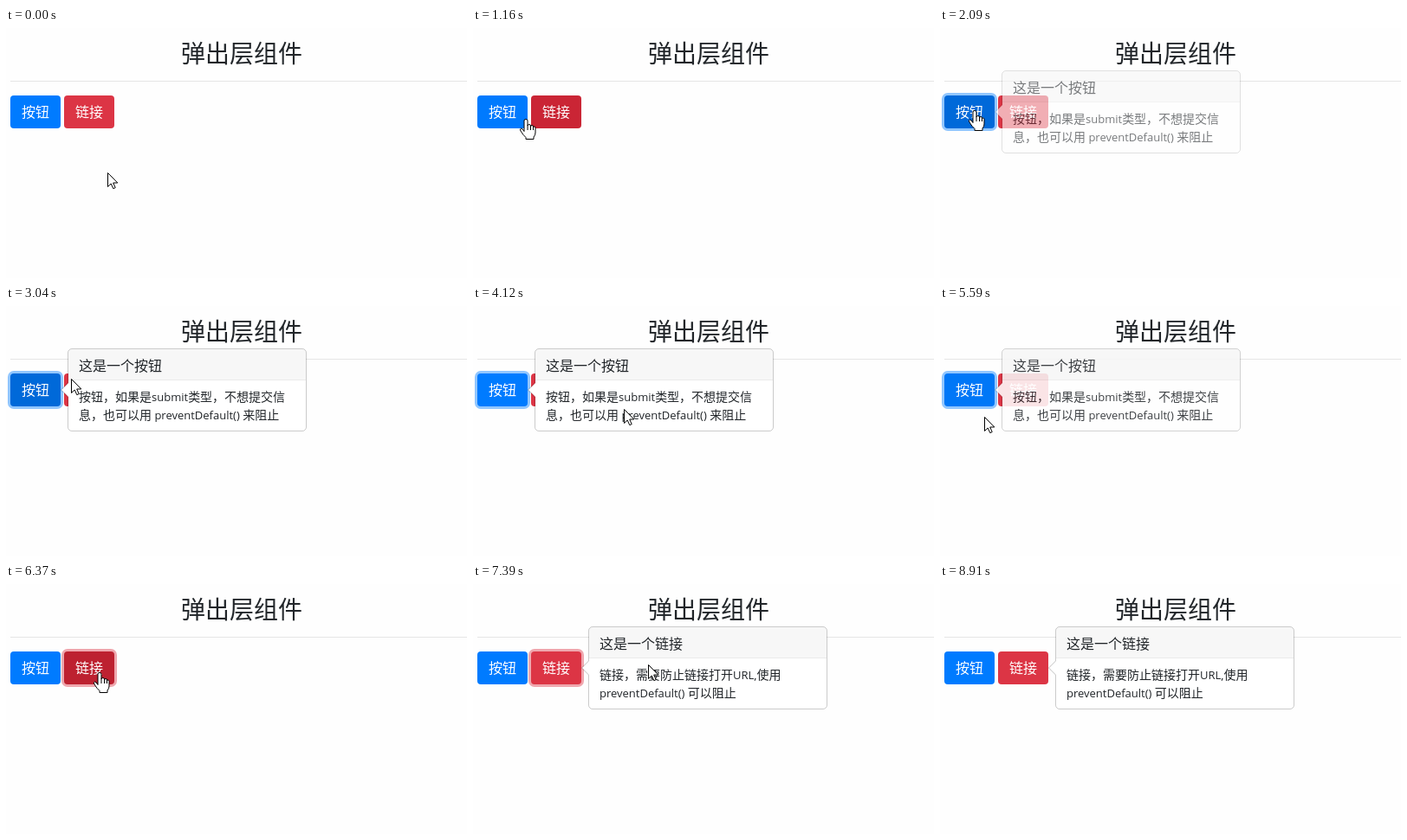
An HTML page that plays this animation: 532x289 px, repeating every 9.22 s.

```html
<!DOCTYPE html>
<html lang="zh-CN">
<head>
<meta charset="utf-8">
<style>
  html, body { margin: 0; width: 100%; height: 100%; overflow: hidden; background: #fefefe; }
  svg { display: block; width: 532px; height: 289px; }
  text { font-family: "Noto Sans CJK SC", "Noto Sans CJK", sans-serif; fill: #212529; }
  .label { font-size: 16px; }
  .button text { fill: #fff; }
  .body { font-size: 14px; }
  .latin { font-family: "Open Sans", "Noto Sans", sans-serif; font-size: 13px; }
  .cursor { fill: #fff; stroke: #000; stroke-linejoin: round; }
</style>
</head>
<body>
<svg viewBox="0 0 532 289">
  <text x="202" y="40" font-size="28">弹出层组件</text>
  <rect x="5" y="61" width="527" height="1" fill="#e5e5e5"/>
  <g id="buttons"></g>
  <g id="popovers"></g>
  <path id="arrow" class="cursor" d="M.5 .5V16.5L4.2 13L6.8 18.7L9.2 17.6L6.7 12H11.8Z"/>
  <path id="hand" class="cursor" d="M-2 14.5V2Q-2 .5 0 .5T2 2V8Q2 6.5 3.7 6.5T5.5 8V9Q5.5 7.5 7 7.5T8.5 9V10Q8.5 9 9.7 9T11 10.5V16Q11 19 9 21V23.5H0V21.5Q-3 19 -6 14Q-7.5 11.5 -5.5 11Q-4 11 -2 14.5ZM2 8V13M5.5 9V13M8.5 10V13"/>
</svg>
<script>
const LOOP = 9220, FADE = 150, STEP = 130, PHASE = 120;
const TOP = 78, WIDTH = 58, HEIGHT = 38;
const byId = id => document.getElementById(id);
const latin = s => `<tspan class="latin">${s}</tspan>`;

const BUTTON = {
  x: 5, label: '按钮', color: [0, 123, 255], hover: [0, 105, 217], active: [0, 98, 204],
  focus: [1800, 6130], press: [1800, 1900], open: [1980, 5560],
  title: '这是一个按钮',
  lines: [`按钮，如果是${latin('submit')}类型，不想提交信`,
          `息，也可以用${latin(' preventDefault() ')}来阻止`]
};
const LINK = {
  x: 67, label: '链接', color: [220, 53, 69], hover: [200, 35, 51], active: [189, 33, 48],
  focus: [6200, 8600], press: [6220, 6440], open: [6520, LOOP],
  title: '这是一个链接',
  lines: [`链接，需要防止链接打开${latin('URL,')}使用`,
          `${latin('preventDefault() ')}可以阻止`]
};
const ITEMS = [BUTTON, LINK];

// Pointer moves; `via` bends a move into a curve
const HOME = [117, 167];
const MOVES = [
  { start: 380, end: 1420, to: [40, 95], via: [91, 113] },
  { start: 2490, end: 2610, to: [58, 93] },
  { start: 3040, end: 3420, to: [124, 56] },
  { start: 3730, end: 4120, to: [174, 119], via: [150, 75] },
  { start: 4260, end: 4840, to: [41, 111] },
  { start: 5480, end: 6240, to: [108, 102], via: [75, 183] },
  { start: 6750, end: 7390, to: [202, 93] },
  { start: 7550, end: 8520, to: [379, 251] },
  { start: 8640, end: 8910, to: [560, 300] }
];

const rgb = c => `rgb(${c.map(Math.round)})`;
const mix = (a, b, p) => a.map((v, i) => v + (b[i] - v) * p);
const clamp = v => Math.min(1, Math.max(0, v));
const smooth = p => p * p * (3 - 2 * p);
const fade = (t, [on, off]) => clamp((t - on) / FADE) - clamp((t - off) / FADE);

function pointerAt(t) {
  let position = HOME;
  for (const { start, end, to, via = mix(position, to, .5) } of MOVES) {
    if (t < start) break;
    const gaps = Math.round((end - start) / STEP);
    const p = clamp((Math.floor((t - start) / (end - start) * gaps + .01) + 1) / (gaps + 1));
    position = mix(mix(position, via, p), mix(via, to, p), p);
  }
  return position.map(Math.round);
}

function isOver(item, t) {
  const [x, y] = pointerAt(t);
  const covered = item === LINK && fade(t, BUTTON.open) > 0;
  return !covered && x >= item.x && x < item.x + WIDTH && y >= TOP && y < TOP + HEIGHT;
}

// Share of the last transition period spent over the item
function hoverLevel(item, t) {
  const samples = 10;
  let over = 0;
  for (let i = 0; i < samples; i++) over += isOver(item, t - FADE * i / samples);
  return smooth(over / samples);
}

function buttonMarkup({ x, label, color }) {
  return `<g class="button">
    <rect class="ring" x="${x - 3}" y="${TOP - 3}" width="${WIDTH + 6}" height="${HEIGHT + 6}" rx="7"
      fill="${rgb(mix(color, [255, 255, 255], .15))}"/>
    <rect class="face" x="${x}" y="${TOP}" width="${WIDTH}" height="${HEIGHT}" rx="4"/>
    <text class="label" x="${x + 13}" y="103">${label}</text></g>`;
}

function popoverMarkup({ x, title, lines }) {
  return `<g class="popover" transform="translate(${x + WIDTH + 8} 49)">
    <rect x="1" y="1" width="274" height="94" rx="4" fill="#fff"/>
    <path d="M1 36V5Q1 1 5 1H271Q275 1 275 5V36Z" fill="#f7f7f7"/>
    <rect x="1" y="36" width="274" height="1" fill="#ebebeb"/>
    <rect x=".5" y=".5" width="275" height="95" rx="4.5" fill="none" stroke="#000" stroke-opacity=".2"/>
    <path d="M0 40L-8 48L0 56Z" fill-opacity=".25"/>
    <path d="M1 40L-7 48L1 56Z" fill="#fff"/>
    <text class="label" x="13" y="26">${title}</text>
    ${lines.map((s, i) => `<text class="body" x="13" y="${61 + 21 * i}">${s}</text>`).join('')}</g>`;
}

byId('buttons').innerHTML = ITEMS.map(buttonMarkup).join('');
byId('popovers').innerHTML = ITEMS.map(popoverMarkup).join('');
ITEMS.forEach((item, i) => {
  const button = byId('buttons').children[i];
  item.ring = button.querySelector('.ring');
  item.face = button.querySelector('.face');
  item.popover = byId('popovers').children[i];
});

function render(time) {
  // Fades refresh in coarse steps, like the pointer
  const t = PHASE + Math.floor((time - PHASE) / STEP + .01) * STEP;
  for (const item of ITEMS) {
    const hovered = mix(item.color, item.hover, hoverLevel(item, t));
    item.face.setAttribute('fill', rgb(mix(hovered, item.active, smooth(fade(t, item.press)))));
    item.ring.setAttribute('opacity', .5 * smooth(fade(t, item.focus)));
    item.popover.setAttribute('opacity', fade(t, item.open));
  }
  const [x, y] = pointerAt(time);
  const onButton = ITEMS.some(item => isOver(item, time));
  for (const id of ['arrow', 'hand']) {
    byId(id).setAttribute('transform', `translate(${x} ${y})`);
    byId(id).setAttribute('visibility', (id === 'hand') === onButton ? 'visible' : 'hidden');
  }
}

const start = performance.now();
function tick() {
  render((performance.now() - start) % LOOP);
  requestAnimationFrame(tick);
}
tick();
</script>
</body>
</html>
```
